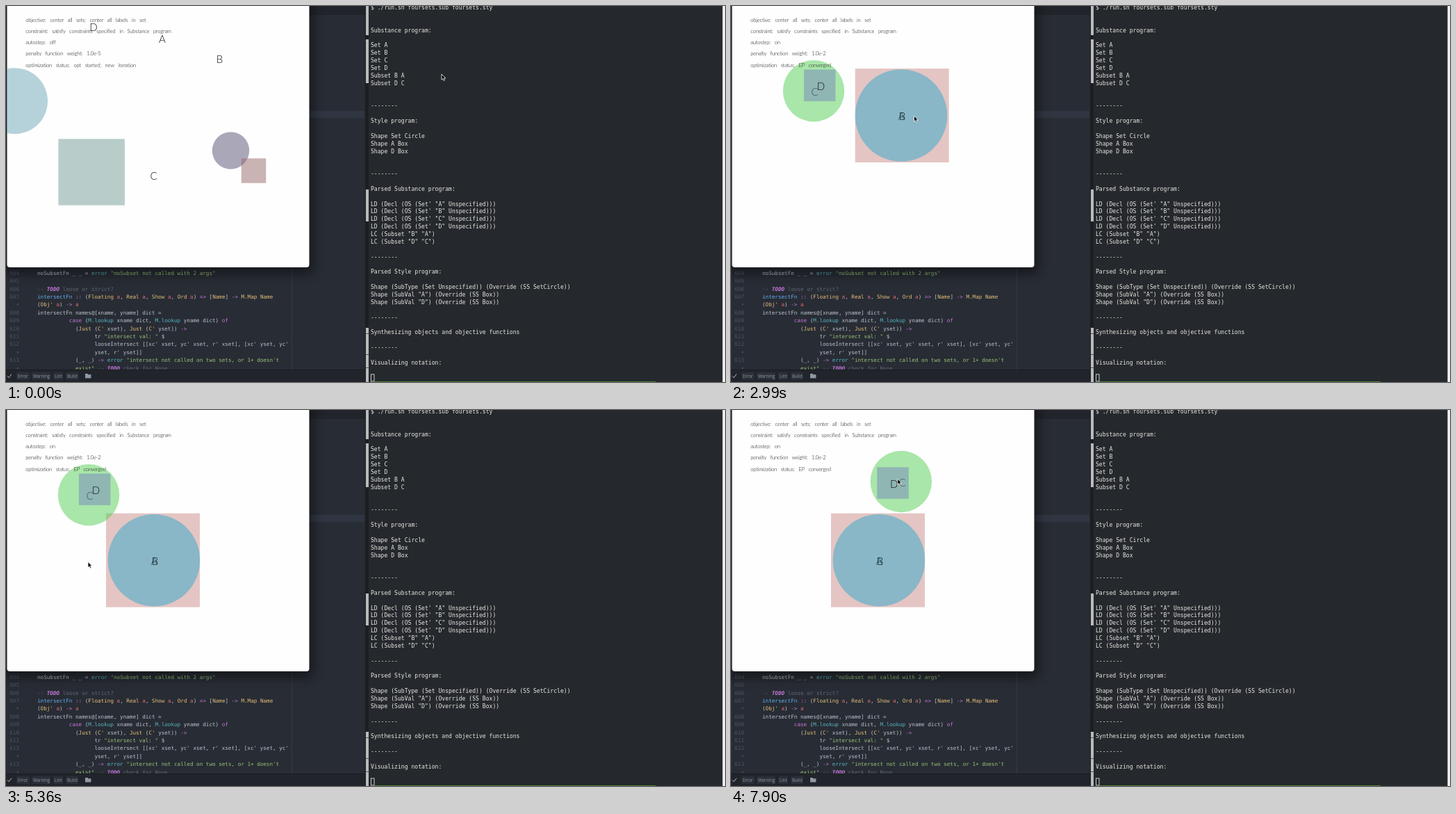
Write an HTML page that moves like this. It is 1035 px wide and 541 px high and loops after 8 s.

```html
<!DOCTYPE html>
<html lang="en">
<head>
<meta charset="utf-8">
<title>Set diagram optimizer</title>
<style>
  html, body { margin: 0; width: 100%; height: 100%; overflow: hidden; background: #282c34; }
  svg { display: block; width: 1035px; height: 541px; }
  text { white-space: pre; }
  .terminal { font: 8.1px "DejaVu Sans Mono", monospace; fill: #e8e8e3; }
  .editor { font: 7.61px "DejaVu Sans Mono", monospace; fill: #bcc2cd; }
  .status { font: 6.2px "Open Sans", sans-serif; fill: #9199a6; }
  .info { font: 300 7.6px Lato, sans-serif; letter-spacing: -.2px; word-spacing: 3.9px; fill: #111; }
  .label { font: 300 15px Lato, sans-serif; text-anchor: middle; fill: #151515; }
</style>
</head>
<body>
<svg viewBox="0 0 1035 541">
  <defs>
    <clipPath id="pane"><path d="M1.5 0H436.5V372a4 4 0 0 1-4 4H5.5a4 4 0 0 1-4-4Z"/></clipPath>
    <filter id="blur" x="-20%" y="-20%" width="140%" height="140%"><feGaussianBlur stdDeviation="8"/></filter>
  </defs>

  <rect width="518" height="541" fill="#282c34"/>
  <rect x="436" width="82" height="13" fill="#21252b"/>
  <rect x="436" y="151" width="80" height="10" fill="#303641"/>
  <path d="M411.5 376V523" stroke="#343a45"/>
  <g id="editor" class="editor"></g>
  <rect x="-6" y="-10" width="449" height="396" rx="8" fill="#000" opacity=".42" filter="url(#blur)"/>

  <rect y="523" width="518" height="18" fill="#21252b"/>
  <path d="M0 523.5H518" stroke="#1a1d22"/>
  <path d="M2 532.5l2 2.2 4-5" fill="none" stroke="#b5bbc5"/>
  <g id="status" class="status"></g>
  <path d="M114 529h3.4l1 1.2h4v5.3h-8.400Z" fill="#9199a6"/>

  <rect x="517" width="518" height="541" fill="#25282c"/>
  <rect x="517" width="5" height="541" fill="#1c1e22"/>
  <path d="M520 0V42M520 48V111M520 264V310M520 463V541" stroke="#b9bbbd" stroke-width="4"/>
  <path d="M518 471.500h4M518 501.500h4M518 520.500h4" stroke="#55585c"/>
  <g id="terminal" class="terminal"></g>
  <rect x="525.5" y="530" width="4.500" height="10" fill="none" stroke="#c9cbc8"/>
  <path d="M530 540.500H935" stroke="#4c7d36"/>
  <rect x="1031.500" width="4" height="541" fill="#f2f2f2"/>

  <g clip-path="url(#pane)">
    <rect width="437" height="377" fill="#fefefe"/>
    <g id="diagram"></g>
    <g id="info" class="info"></g>
  </g>
  <path id="cursor" d="M0 0V8.200L1.900 6.500 3.200 9.400 4.700 8.700 3.400 5.900H5.900Z" fill="#000" stroke="#fff" stroke-width=".8"/>
</svg>

<script>
const LOOP = 8000;
const $ = id => document.getElementById(id);

function add(parent, tag, attrs = {}, content = "") {
  const node = document.createElementNS("http://www.w3.org/2000/svg", tag);
  set(node, attrs);
  node.textContent = content;
  return parent.appendChild(node);
}
function set(node, attrs) {
  for (const key in attrs) node.setAttribute(key, attrs[key]);
}

// Terminal output: row number and the lines that start there
const output = {
  0: "$ ./run.sh foursets.sub foursets.sty",
  3: "Substance program:",
  5: "Set A\nSet B\nSet C\nSet D\nSubset B A\nSubset D C",
  15: "Style program:",
  17: "Shape Set Circle\nShape A Box\nShape D Box",
  24: "Parsed Substance program:",
  26: [..."ABCD"].map(s => `LD (Decl (OS (Set' "${s}" Unspecified)))`).join("\n"),
  30: 'LC (Subset "B" "A")\nLC (Subset "D" "C")',
  35: "Parsed Style program:",
  37: "Shape (SubType (Set Unspecified)) (Override (SS SetCircle))",
  38: ["A", "D"].map(s => `Shape (SubVal "${s}") (Override (SS Box))`).join("\n"),
  43: "Synthesizing objects and objective functions",
  47: "Visualizing notation:"
};
for (const row of [13, 22, 33, 41, 45]) output[row] = "--------";
for (const [row, block] of Object.entries(output))
  block.split("\n").forEach((line, i) =>
    add($("terminal"), "text", { x: 525, y: 5 + 10.87 * (+row + i) }, line));

// Editor: gutter mark, indent, code
const code = [
  ["604", 0, 'noSubsetFn _ _ = error "noSubset not called with 2 args"'],
  ["605", 0, ""],
  ["606", 0, "-- TODO loose or strict?"],
  ["607", 0, "intersectFn :: (Floating a, Real a, Show a, Ord a) => [Name] -> M.Map Name"],
  ["•", 0, "(Obj' a) -> a"],
  ["608", 0, "intersectFn names@[xname, yname] dict ="],
  ["609", 10, "case (M.lookup xname dict, M.lookup yname dict) of"],
  ["610", 12, "(Just (C' xset), Just (C' yset)) ->"],
  ["611", 18, 'tr "intersect val: " $'],
  ["612", 18, "looseIntersect [[xc' xset, yc' xset, r' xset], [xc' yset, yc'"],
  ["•", 18, "yset, r' yset]]"],
  ["613", 12, `(_, _) -> error "intersect not called on two sets, or 1+ doesn't`],
  ["•", 12, 'exist" -- TODO check for None']
];
const syntax = [
  ['^exist"|"[^"]*(?:"|$)', "#98c379"],
  ["--|loose or strict\\?|check for None", "#5f6775"],
  ["TODO|\\bcase\\b|\\bof\\b|=>|->|::", "#c678dd"],
  ["M\\.lookup|\\berror\\b", "#56b6c2"],
  ["intersectFn(?= ::)", "#61afef"],
  ["Floating|Real|Show|Ord|M\\.Map|Name|Just|Obj'|C'", "#e5c07b"],
  ["\\ba\\b", "#e06c75"]
];
const tokens = new RegExp(syntax.map(([rule]) => `(${rule})`).join("|"), "g");

code.forEach(([mark, indent, line], i) => {
  const y = 386.700 + 11.42 * i;
  add($("editor"), "text", { x: 19, y, "text-anchor": "end", fill: "#4d5565" }, mark);
  const text = add($("editor"), "text", { x: 45 + 4.58 * indent, y });
  let end = 0;
  for (const match of line.matchAll(tokens)) {
    add(text, "tspan", {}, line.slice(end, match.index));
    const kind = match.slice(1).findIndex(group => group !== undefined);
    const span = add(text, "tspan", { fill: syntax[kind][1] }, match[0]);
    if (match[0] === "TODO") set(span, { "font-style": "italic", "font-weight": "bold" });
    end = match.index + match[0].length;
  }
  add(text, "tspan", {}, line.slice(end));
});

[["Error", 17, 15], ["Warning", 39, 23], ["Lint", 70, 10], ["Build", 88, 14]].forEach(([name, x, w]) => {
  add($("status"), "rect", { x: x - 2, y: 527, width: w + 4, height: 11, rx: 1.5, fill: "#2b3038" });
  add($("status"), "text", { x, y: 535 }, name);
});

// Diagram: each set is a shape followed by its label
const sets = {};
for (const name of "ABCD") {
  const tag = name === "A" || name === "D" ? "rect" : "circle";
  sets[name] = {
    shape: add($("diagram"), tag, { "fill-opacity": .5 }),
    label: add($("diagram"), "text", { class: "label" }, name)
  };
}
const info = [0, 1, 2, 3, 4].map(i => add($("info"), "text", { x: 28.3, y: 22.5 + 16.3 * i }));

function drawSet(name, [x, y, size, labelX, labelY], fill) {
  const { shape, label } = sets[name];
  set(shape, shape.tagName === "rect"
    ? { x: x - size / 2, y: y - size / 2, width: size, height: size, fill }
    : { cx: x, cy: y, r: size, fill });
  set(label, { x: labelX, y: labelY + 5.4 });
}

const sampled = {
  A: [123.2, 239, 95.5, 225, 47.5],
  B: [12.5, 136.700, 47.5, 307.5, 76.5],
  C: [323.500, 208, 26.7, 212.5, 245],
  D: [356.5, 237, 35.5, 126, 30.500]
};
const resampled = {
  A: [355.5, 280.5, 135, 300, 90],
  B: [205, 190, 50, 150, 300],
  C: [25, 30, 44, 250, 250],
  D: [110, 250, 45.5, 330, 150]
};
const firstColors = { A: "#759d97", B: "#6fa7b9", C: "#595377", D: "#976b6b" };
const colors = { A: "#cb8e8a", B: "#31aacc", C: "#57cf57", D: "#7787bd" };

// Tracks: [time, x, y]
const boxPath = [
  [2240, 204, 168], [2390, 204, 168], [2690, 365, 116], [2990, 246.2, 157.5], [3290, 246.2, 157.5],
  [3740, 309, 304], [4190, 300, 250], [4490, 284, 209.5], [4780, 351, 150], [5070, 67.5, 200], [5360, 211.5, 216.2]
];
const innerOffset = [[2240, 0, 1], [2990, -1.2, 0], [4490, 1, .5], [5360, 1.5, 0]];
const circlePath = [
  [5660, 119, 122.2], [6100, 388, 98], [6550, 150, 100], [7150, 196.7, 112], [7450, 225, 79], [7600, 244.8, 103]
];
const smallOffset = [[5660, 8.7, -8], [6550, -12, 0], [7150, -12, .6], [7600, -11.8, 2]];
const cursorPath = [
  [2090, 381.5, 207.5], [2390, 221, 169], [2690, 382, 117], [2990, 263.5, 158], [3140, 256, 160],
  [3290, 263, 158], [3740, 326, 305], [4190, 265, 210], [4490, 247.8, 160], [4780, 315, 120],
  [5070, 84, 200], [5360, 118, 218.5], [5660, 122, 130], [6100, 391, 106], [6550, 159, 108],
  [7150, 228.5, 98.5], [7450, 270, 72], [7600, 345, 95], [7900, 239.7, 99]
];

function at(track, t) {
  const next = track.findIndex(key => key[0] > t);
  if (next === 0) return track[0].slice(1);
  if (next < 0) return track[track.length - 1].slice(1);
  const [from, to] = [track[next - 1], track[next]];
  const k = (t - from[0]) / (to[0] - from[0]);
  return [1, 2].map(i => from[i] + (to[i] - from[i]) * k);
}

const bursts = [[2240, 3140, 7], [3290, 4190, 7], [4340, 5360, 8], [5510, 6550, 8], [6700, 7600, 7], [7750, 7900, 2]];
const steps = [0, 300, 900, 1650, ...bursts.flatMap(([first, last, count]) =>
  Array.from({ length: count }, (_, i) => first + Math.round(i * (last - first) / (count - 1) / 10) * 10))];

function optimized(t) {
  const [ax, ay] = at(boxPath, t), [ox, oy] = at(innerOffset, t);
  const [cx, cy] = at(circlePath, t), [sx, sy] = at(smallOffset, t);
  const [bx, by] = [ax + ox, ay + oy], [dx, dy] = [cx + sx, cy + sy];
  return {
    A: [ax, ay, 135, bx + .3, by + 1],
    B: [bx, by, 66.3, bx + 1.5, by + 1],
    C: [cx, cy, 44.2, cx + 1.6, cy + 1.5],
    D: [dx, dy, 45.5, dx + 1.8, dy + 1.5]
  };
}

function render(time) {
  const t = steps.filter(step => step <= time).pop();
  const running = t >= 1650;
  const pose = t < 900 ? sampled : running ? optimized(t) : resampled;
  const palette = t < 900 ? firstColors : colors;
  for (const name in sets) drawSet(name, pose[name], palette[name]);

  [
    "objective: center all sets; center all labels in set",
    "constraint: satisfy constraints specified in Substance program",
    `autostep: ${running ? "on" : "off"}`,
    `penalty function weight: ${running ? "1.0e-2" : "1.0e-5"}`,
    `optimization status: ${running ? "EP converged" : "opt started; new iteration"}`
  ].forEach((line, i) => info[i].textContent = line);

  const [x, y] = t < 300 ? [627, 98] : at(cursorPath, t);
  set($("cursor"), { transform: `translate(${x} ${y})` });
}

const start = performance.now();
function tick() {
  render((performance.now() - start) % LOOP);
  requestAnimationFrame(tick);
}
tick();
</script>
</body>
</html>
```
